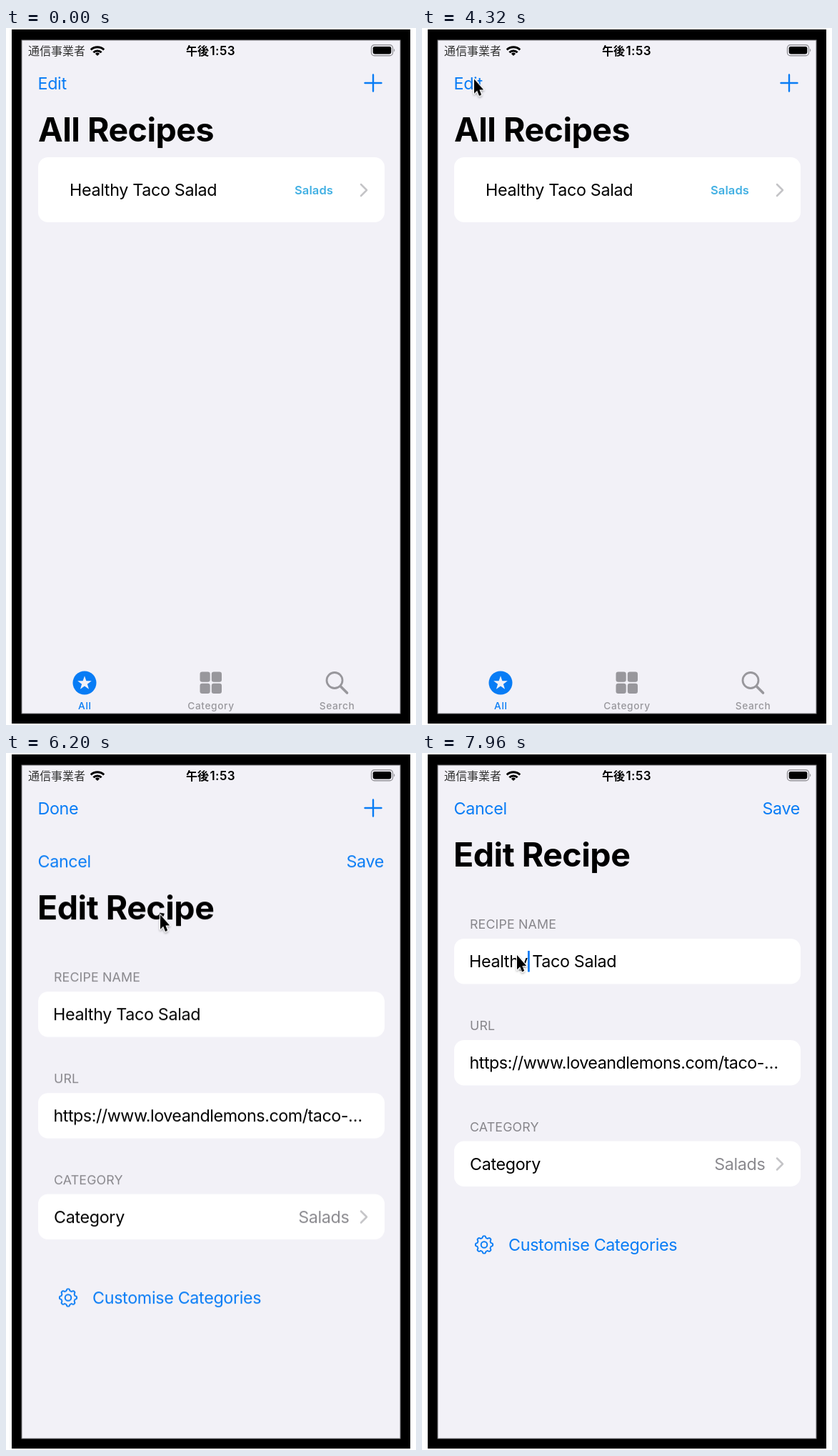
Recreate the animation shown at these times as an HTML page. Size 574 by 976 pixels, loop 8 s.

```html
<!DOCTYPE html>
<html lang="en">
<head>
<meta charset="utf-8">
<title>Recipe editor</title>
<style>
  html, body { margin: 0; width: 100%; height: 100%; overflow: hidden; background: #fff; }
  svg { display: block; width: 100%; height: 100%; }
  text {
    font: 400 23.3px Inter, "Noto Sans", sans-serif;
    font-optical-sizing: none;
    letter-spacing: -.33px;
  }
  .title { font-weight: 700; font-size: 46.5px; letter-spacing: -.5px; }
  .tag { font-weight: 600; font-size: 16.5px; letter-spacing: .1px; fill: #42b0e3; }
  .label { font-size: 17.8px; letter-spacing: .15px; fill: #87868b; }
  .tab { font-weight: 500; font-size: 13.7px; letter-spacing: .6px; text-anchor: middle; }
  .url { letter-spacing: -.48px; }
  .cjk { font-family: "Noto Sans CJK JP", "Noto Sans CJK", sans-serif; font-size: 16px; letter-spacing: 0; }
  .clock { font-weight: 600; font-size: 17px; letter-spacing: .4px; }
  .end { text-anchor: end; }
  .blue { fill: #087cf5; }
  .grey { fill: #98979c; }
  .page { fill: #f2f1f7; }
  .card { fill: #fff; }
  .line { fill: none; stroke-linecap: round; stroke-linejoin: round; }

  .anim { animation: 8s linear infinite; }
  #mouse { animation-name: mouse; animation-timing-function: ease-in-out; }
  #pointer { animation-name: pointer; animation-timing-function: step-end; }
  #edit { animation-name: edit; }
  #done { animation-name: done; }
  #name { animation-name: name; }
  #minus { animation-name: minus; }
  #sheet { animation-name: sheet; }
  #caret { animation-name: caret; animation-timing-function: step-end; }

  @keyframes mouse {
    0%, 28% { transform: translate(290px, 704px); }
    38%, 38.5% { transform: translate(170px, 203px); }
    48%, 63% { transform: translate(73px, 71.5px); }
    69.5% { transform: translate(208px, 248px); }
    73%, 85% { transform: translate(216px, 226.5px); }
    87.5%, 98.5% { transform: translate(112px, 283px); animation-timing-function: linear; }
    99.5%, 100% { transform: translate(133px, 283px); }
  }
  @keyframes pointer { 0% { opacity: 0; } 28%, 100% { opacity: 1; } }
  @keyframes edit {
    0%, 51.9% { opacity: 1; }
    52.5%, 53.3% { opacity: .35; }
    54%, 54.5% { opacity: 1; }
    57%, 100% { opacity: 0; }
  }
  @keyframes done { 0%, 54.5% { opacity: 0; } 57%, 100% { opacity: 1; } }
  @keyframes name {
    0%, 54.5% { transform: none; animation-timing-function: ease-in-out; }
    59%, 100% { transform: translateX(56.5px); }
  }
  @keyframes minus {
    0%, 54.5% { transform: translateX(-40px); opacity: 0; animation-timing-function: ease-in-out; }
    59%, 100% { transform: none; opacity: 1; }
  }
  /* critically damped spring */
  @keyframes sheet {
    0%, 74.65% {
      transform: translateY(943px);
      animation-timing-function: linear(0, .105 5%, .3 10%, .49 15%, .645 20%, .759 25%, .841 30%,
        .896 35%, .933 40%, .973 50%, .991 60%, .9985 80%, 1);
    }
    82.1%, 100% { transform: none; }
  }
  @keyframes caret { 0% { opacity: 0; } 90.5%, 100% { opacity: 1; } }
</style>
</head>
<body>
<svg viewBox="0 0 574 976">
  <defs>
    <clipPath id="screen"><rect x="22" y="17" width="530" height="943"/></clipPath>
    <clipPath id="rowClip"><rect x="45" y="181" width="485" height="91" rx="14"/></clipPath>
    <path id="chevron" class="line" d="M497 -8l8 8l-8 8" stroke="#c4c4c7" stroke-width="2.5"/>
    <filter id="shadow" x="-60%" y="-40%" width="220%" height="200%">
      <feDropShadow dx="0" dy="1.5" stdDeviation="1.5" flood-opacity=".35"/>
    </filter>
  </defs>

  <rect x="8" y="2" width="558" height="972"/>
  <g clip-path="url(#screen)">
    <rect class="page" x="22" y="17" width="530" height="943"/>

    <g id="edit" class="anim"><text class="blue" x="44.5" y="85.5">Edit</text></g>
    <g id="done" class="anim"><text class="blue" x="44.5" y="85.5">Done</text></g>
    <path class="line" d="M502.5 77h23M514 65.5v23" stroke="#087cf5" stroke-width="2.4"/>
    <text class="title" x="45" y="159">All Recipes</text>

    <rect class="card" x="45" y="181" width="485" height="91" rx="14"/>
    <g clip-path="url(#rowClip)">
      <g id="minus" class="anim">
        <circle cx="84" cy="227" r="15" fill="#ff3b30"/>
        <path class="line" d="M77.5 227h13" stroke="#fff" stroke-width="2.5"/>
      </g>
      <g id="name" class="anim"><text x="89" y="235">Healthy Taco Salad</text></g>
    </g>
    <text class="tag end" x="458" y="233">Salads</text>
    <use href="#chevron" y="227"/>

    <circle class="blue" cx="110" cy="917" r="16.5"/>
    <path id="star" class="page"/>
    <text class="tab blue" x="110.3" y="954">All</text>
    <g class="grey">
      <rect x="271.5" y="901.5" width="14.2" height="14.2" rx="3.2"/>
      <rect x="287.8" y="901.5" width="14.2" height="14.2" rx="3.2"/>
      <rect x="271.5" y="917.7" width="14.2" height="14.2" rx="3.2"/>
      <rect x="287.8" y="917.7" width="14.2" height="14.2" rx="3.2"/>
      <text class="tab" x="287" y="954">Category</text>
      <text class="tab" x="463.5" y="954">Search</text>
    </g>
    <g class="line" stroke="#98979c">
      <circle cx="460" cy="913.5" r="11" stroke-width="2.8"/>
      <path d="M468.5 922l9 9" stroke-width="3.6"/>
    </g>

    <g id="sheet" class="anim">
      <rect class="page" x="22" y="17" width="530" height="943"/>
      <text class="blue" x="44.5" y="85.5">Cancel</text>
      <text class="blue end" x="529" y="85.5">Save</text>
      <text class="title" x="44" y="159">Edit Recipe</text>

      <text class="label" x="67" y="245.5">RECIPE NAME</text>
      <rect class="card" x="45" y="260" width="485" height="63.5" rx="14"/>
      <text x="66" y="300">Healthy Taco Salad</text>

      <text class="label" x="67" y="387.5">URL</text>
      <rect class="card" x="45" y="402" width="485" height="63.5" rx="14"/>
      <text class="url" x="66.5" y="442">https://www.loveandlemons.com/taco-…</text>

      <text class="label" x="67" y="529.5">CATEGORY</text>
      <rect class="card" x="45" y="543.5" width="485" height="63.5" rx="14"/>
      <text x="67" y="584">Category</text>
      <text class="end" x="480.5" y="584" fill="#8b8a8f">Salads</text>
      <use href="#chevron" y="575.5"/>

      <g class="line" stroke="#087cf5" stroke-width="1.9" transform="translate(87 688.5)">
        <path id="gear"/>
        <circle r="4.3"/>
      </g>
      <text class="blue" x="121" y="697">Customise Categories</text>
    </g>

    <g id="caret" class="anim"><rect x="148" y="277" width="2.8" height="29.5" fill="#087cf5"/></g>

    <text class="cjk" x="31" y="38" fill="#333">通信事業者</text>
    <g transform="translate(0 -.8)">
      <g class="line" stroke="#000" stroke-width="3" style="stroke-linecap: butt">
        <path d="M118.8 31.3a13.3 13.3 0 0 1 18.4 0"/>
        <path d="M122.4 35a8 8 0 0 1 11.2 0"/>
      </g>
      <path d="M124.9 36.7a4.5 4.5 0 0 1 6.2 0l-3.1 3.2z"/>
    </g>
    <text class="cjk" x="252" y="38" style="font-weight: 700">午後</text>
    <text class="clock" x="285.5" y="38">1:53</text>
    <rect x="511.5" y="23.7" width="30" height="15" rx="4.2" fill="none" stroke="#97969b" stroke-width="1.4"/>
    <rect x="513.7" y="25.9" width="25.6" height="10.6" rx="2.4"/>
    <path d="M543 28.8q2.6 2.4 0 4.8z" fill="#97969b"/>

    <g id="mouse" class="anim"><g id="pointer" class="anim">
      <path d="M0 0V20.3L4.2 16.2L7 23.4L10.2 22L7.4 14.9H13.2Z"
        stroke="#fff" stroke-width="2.2" stroke-linejoin="round" paint-order="stroke" filter="url(#shadow)"/>
    </g></g>
  </g>
  <rect x="22" y="17" width="530" height="943" fill="none" stroke="#77767a"/>
</svg>
<script>
  // Closed outline through count points given by radius(angle, index).
  const ring = (count, radius, cx = 0, cy = 0) => 'M' + Array.from({ length: count }, (_, i) => {
    const angle = i / count * 2 * Math.PI - Math.PI / 2;
    const r = radius(angle, i);
    return `${(cx + r * Math.cos(angle)).toFixed(2)} ${(cy + r * Math.sin(angle)).toFixed(2)}`;
  }).join('L') + 'Z';
  const draw = (id, d) => document.getElementById(id).setAttribute('d', d);

  draw('star', ring(10, (_, i) => i % 2 ? 4.1 : 10.3, 110, 917.5));
  draw('gear', ring(128, a => 10.9 + 1.2 * Math.max(-1, Math.min(1, 1.8 * Math.cos(8 * a)))));
</script>
</body>
</html>
```
